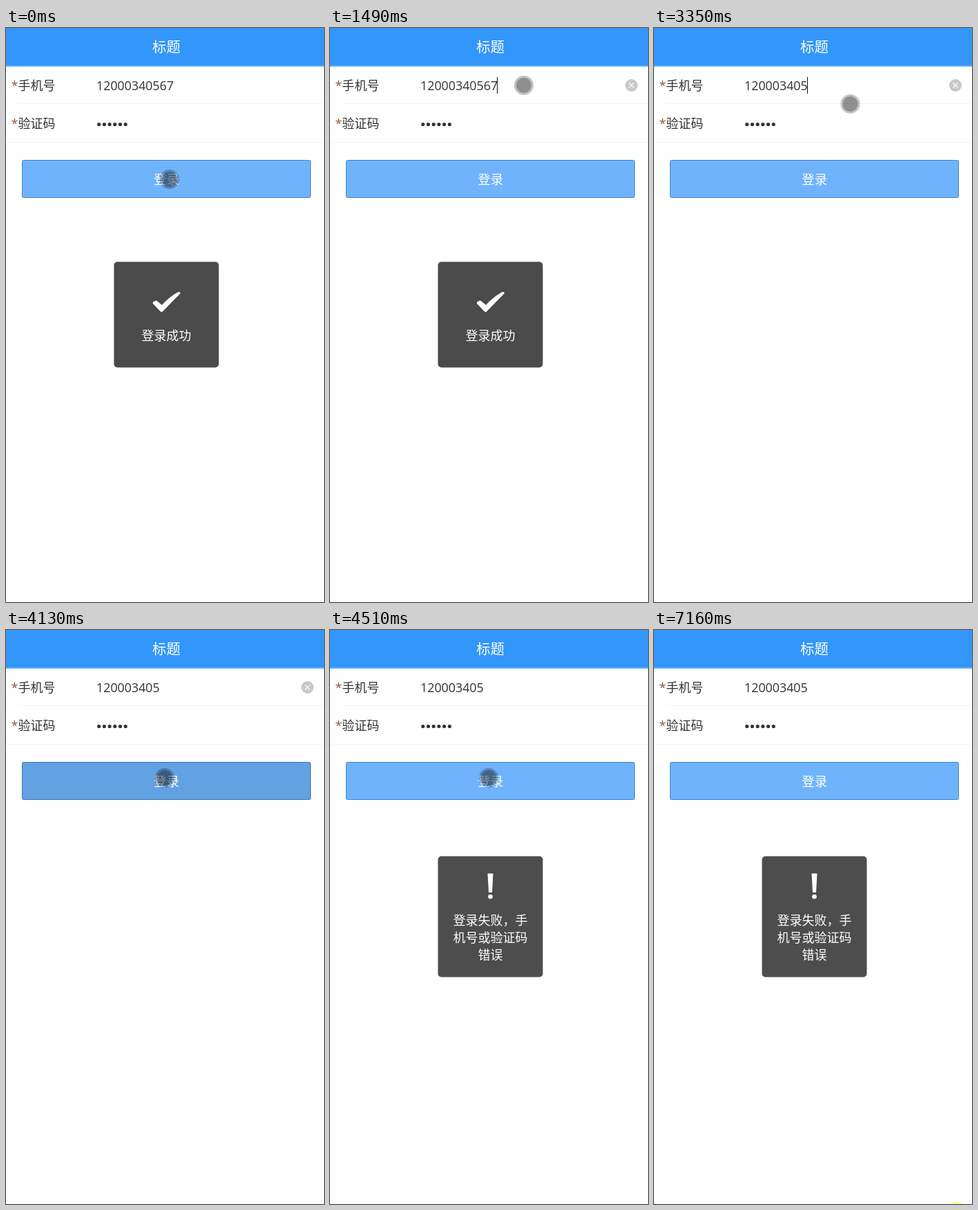
These frames come from a looping animation (461x831 px, 7.26 s). An HTML page:

```html
<!DOCTYPE html>
<html lang="zh-CN">
<head>
<meta charset="utf-8">
<title>登录</title>
<style>
  html, body { margin: 0; width: 100%; height: 100%; overflow: hidden; background: #fff; }
  svg { display: block; width: 461px; height: 831px; }
  text { font: 18px "Noto Sans CJK SC", "Noto Sans CJK", sans-serif; fill: #333; }
  .mid { text-anchor: middle; }
  .light text, .white { fill: #fff; }
  .latin { font: 17.84px "Open Sans", sans-serif; }
  .star { font: 18px "Open Sans", sans-serif; fill: #a0513c; }
  .rule { stroke: #f4f4f4; }
</style>
</head>
<body>
<svg viewBox="0 0 461 831">
  <rect width="461" height="55" fill="#3296fa"/>
  <rect y="54" width="461" height="2" fill="#68b0f8"/>
  <text class="mid white" x="232.5" y="35" style="font-size:20.5px">标题</text>

  <text class="star" x="7.5" y="90">*</text>
  <text x="17.5" y="90">手机号</text>
  <text class="latin" id="phone" x="131" y="90"></text>
  <rect id="caret" y="71" width="1" height="24" fill="#111"/>
  <g id="clear">
    <circle cx="437" cy="83" r="9" fill="#c8c8cc"/>
    <path d="M433.5 79.5l7 7m0-7l-7 7" stroke="#fff" stroke-width="1.2"/>
  </g>
  <path class="rule" d="M17 109.5H461M0 165.5H461"/>

  <text class="star" x="7.5" y="145">*</text>
  <text x="17.5" y="145">验证码</text>
  <path d="M134.8 139.5h38.6" stroke="#333" stroke-width="5.2" stroke-linecap="round" stroke-dasharray="0 7.7"/>

  <rect id="button" x="23.5" y="191.5" width="418" height="54" rx="2"/>
  <text class="mid white" x="232.7" y="226" style="font-size:18.5px">登录</text>

  <g id="success" class="light">
    <rect x="156.5" y="338.5" width="152" height="153" rx="5" fill="#4b4b4b"/>
    <path d="M213 399Q212 397 215 395.5L218 394.5L226 401Q237 389 249 382.5Q252 381 253 384L227 410.5Q225.500 411.500 224 410.500Z" fill="#fff"/>
    <text class="mid" x="232.5" y="452">登录成功</text>
  </g>
  <g id="failure" class="light">
    <rect x="156.5" y="327.500" width="152" height="175" rx="5" fill="#4b4b4b"/>
    <path d="M228.500 352.500h8l-1.500 27.500h-5z" fill="#fff"/>
    <circle cx="232.5" cy="386" r="3.3" fill="#fff"/>
    <text class="mid" x="232.5" y="426.500">登录失败，手</text>
    <text class="mid" x="232.5" y="451.500">机号或验证码</text>
    <text class="mid" x="232.5" y="476.500">错误</text>
  </g>

  <g id="pointer">
    <circle r="11" fill-opacity=".44"/>
    <circle r="12.500" fill="none" stroke="#000" stroke-opacity=".24" stroke-width="3"/>
  </g>
  <circle id="glow" cx="439" cy="843" r="15" fill="#ffff80"/>
</svg>
<script>
const LOOP = 7260, TICK = 77, PHONE = '12000340567';
const $ = id => document.getElementById(id);
const show = (id, on) => $(id).setAttribute('visibility', on ? 'visible' : 'hidden');
const within = (t, ...spans) => spans.some(([a, b]) => t >= a && t < b);
const clamp = v => Math.max(0, Math.min(1, v));
const smooth = v => v * v * (3 - 2 * v);

// Each stroke: start, number of ticks, quadratic path (from, control, to).
const strokes = [
  [860, 8, [237, 219], [265, 150], [281, 83]],
  [3200, 6, [281, 83], [295, 128], [254, 227]],
  [3750, 2, [254, 227], [242, 220], [230, 214]],
  [5680, 2, [230, 214], [333, 323], [436, 432]],
];

function pointerAt(t) {
  const [start, ticks, a, b, c] = strokes.filter(s => t >= s[0]).pop() || strokes[0];
  const step = t < start ? 0 : Math.floor((t - start) / TICK) + 1;
  const u = smooth(clamp(step / ticks));
  return a.map((v, i) => v * (1 - u) ** 2 + 2 * b[i] * u * (1 - u) + c[i] * u * u);
}

// Holds the last value whose time has passed.
const held = (t, keys) => keys.filter(k => t >= k[0]).pop()[1];

function draw(t) {
  const digits = held(t, [[0, 11], [2340, 10], [2490, 9]]);
  $('phone').textContent = PHONE.slice(0, digits);
  $('caret').setAttribute('x', Math.floor(131 + digits * 10.18));
  show('caret', within(t, [1490, 2020], [2340, 2880], [3350, 3810]));
  show('clear', within(t, [1490, 4210]));

  const pressed = within(t, [4130, 4430]);
  $('button').setAttribute('fill', pressed ? '#62a1e2' : '#6eb3fc');
  $('button').setAttribute('stroke', pressed ? '#3c76b4' : '#4285c6');

  $('success').setAttribute('opacity', held(t, [[0, 1], [2570, .6], [2660, .2], [2760, 0]]));
  $('failure').setAttribute('opacity', held(t, [[0, 0], [4360, .58], [4430, .88], [4510, .99]]));

  $('pointer').setAttribute('transform', `translate(${pointerAt(t)})`);
  show('pointer', t < 5850);
  show('glow', t >= 7160);
}

const begin = performance.now();
function frame() {
  draw((performance.now() - begin) % LOOP);
  requestAnimationFrame(frame);
}
frame();
</script>
</body>
</html>
```
